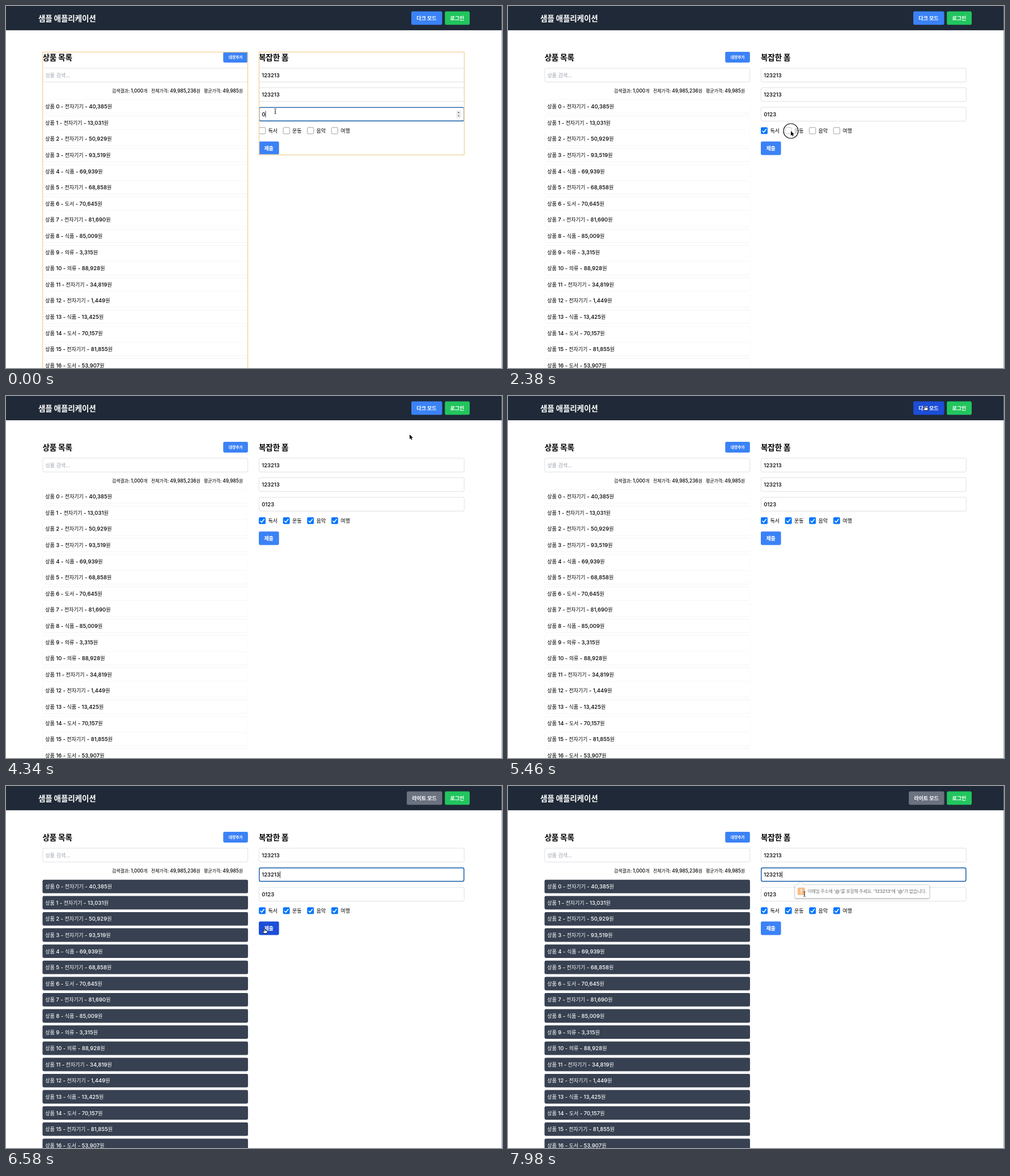
Write an HTML page that moves like this. It is 875 px wide and 640 px high and loops after 8000 ms.

```html
<!DOCTYPE html>
<html lang="ko">
<head>
<meta charset="utf-8">
<style>
html, body { margin: 0; width: 100%; height: 100%; overflow: hidden; background: #fff; }
svg { display: block; width: 875px; height: 640px; }
text { font: 500 9.53px Inter, "Noto Sans CJK KR", "Noto Sans CJK", sans-serif; white-space: pre; }
.k { font-family: "Noto Sans CJK KR", "Noto Sans CJK", sans-serif; font-size: .95em; letter-spacing: -.01em; }
.h { font-size: 14.3px; font-weight: 700; word-spacing: -.04em; }
.b { font-weight: 700; fill: #fff; }
.s { font-size: 8.34px; word-spacing: -.03em; }
.t { font-size: 7.15px; }
.tip { font-size: 8.15px; word-spacing: -.04em; }
.ph { fill: #9ca3af; font-weight: 400; }
.field { fill: #fff; stroke: #d1d5db; stroke-width: .7; }
#rows { filter: drop-shadow(0 .9px .5px rgba(0,0,0,.17)); }
#bubble { filter: drop-shadow(.5px 1px 1.2px rgba(0,0,0,.55)); }
</style>
</head>
<body>
<svg id="stage" viewBox="0 0 875 640"></svg>
<script>
const LOOP = 8000;
const BLUE = '#3b82f6', DEEP = '#1d4ed8', GRAY = '#6b7280', SLATE = '#374151';
const stage = document.getElementById('stage');

const wrap = s => s.replace(/[가-힣]+/g, m => `<tspan class="k">${m}</tspan>`);
const text = (x, y, s, cls = '', more = '') => `<text x="${x}" y="${y}" class="${cls}" ${more}>${wrap(s)}</text>`;
const rect = (x, y, w, h, more = '', r = 2.4) => `<rect x="${x}" y="${y}" width="${w}" height="${h}" rx="${r}" ${more}/>`;
const group = (id, body) => `<g id="${id}">${body}</g>`;

const kinds = { e: '전자기기', f: '식품', b: '도서', c: '의류' };
const items = ('e40,385 e13,031 e50,929 e93,519 f69,939 e68,858 b70,645 e81,690 f85,009 ' +
  'c3,315 c88,928 e34,819 e1,449 f13,425 b70,157 e81,855 b53,907').split(' ');
const hobbies = ['독서', '운동', '음악', '여행'];
const fieldY = [109.9, 144.4, 179.1];
const boxX = i => 446.4 + 42.6 * i;
const rowY = i => 165.8 + 28.6 * i;

const outline = (x, y, w, h) =>
  rect(x, y, w, h, 'fill="none" stroke="#f3f3f3" stroke-width="1.8"', 0) +
  rect(x, y, w, h, 'fill="none" class="line" stroke-width=".6"', 0);

const arrow = 'M0 0V8.2L1.9 6.5L3.2 9.4L4.6 8.8L3.3 6H5.9Z';
const hand = 'M-.9 0Q0-1 .8 0V3.2L4.4 4.1Q5.3 4.5 5.1 5.6L4.3 8.6H-.8L-3.2 5.2Q-3.2 4-1.9 4.4L-.9 5.3Z';
const beam = 'M-1.8-4.4Q0-4.4 0-3.4Q0-4.4 1.8-4.4M0-3.4V3.4M-1.8 4.4Q0 4.4 0 3.4Q0 4.4 1.8 4.4M-1 .9H1';

stage.innerHTML =
  rect(0, 0, 875, 640, 'fill="#fff"', 0) +
  rect(0, 0, 875, 42.9, 'fill="#1f2937"', 0) +
  rect(874, 0, 1, 640, 'fill="#8b8f96" opacity=".7"', 0) +
  text(57, 26.6, '샘플 애플리케이션', 'h', 'fill="#fff"') +
  rect(715, 9.5, 55, 23.8, 'id="mode"') +
  text(724.3, 25, '', 'b', 'id="modeText"') +
  rect(774.2, 9.5, 43.8, 23.8, 'fill="#22c55e"') + text(783.5, 25, '로그인', 'b') +
  text(64.5, 95.6, '상품 목록', 'h') +
  rect(383.2, 81.1, 43.6, 18.9, `fill="${BLUE}"`) + text(392.8, 93.2, '대량추가', 'b t') +
  rect(64.8, 109.9, 361.8, 24.4, 'class="field"') + text(69.4, 125.5, '상품 검색...', 'ph') +
  text(187, 153, '검색결과: 1,000개', 's') + text(256, 153, '전체가격: 49,985,236원', 's') +
  text(349, 153, '평균가격: 49,985원', 's') +
  group('rows', items.map((_, i) => rect(64.5, rowY(i), 362.4, 23.8)).join('')) +
  group('rowText', items.map((s, i) =>
    text(69.2, rowY(i) + 15.3, `상품 ${i} - ${kinds[s[0]]} - ${s.slice(1)}원`)).join('')) +
  text(446, 95.6, '복잡한 폼', 'h') +
  fieldY.map((y, i) => rect(446.4, y, 361.9, 24.4, 'class="field"') +
    text(451.2, y + 15.6, i < 2 ? '123213' : '0', '', `id="value${i}"`)).join('') +
  rect(446.8, 0, 361, 23.8, 'id="focus" fill="none" stroke="#155ba6" stroke-width="1.4"') +
  rect(0, 0, .8, 11.6, 'id="caret"', 0) +
  group('spin', rect(794, 184.6, 9, 13.4, 'fill="#efefef"', 1) +
    '<path d="M796.8 189.2L798.5 187L800.2 189.2ZM796.8 193.4L798.5 195.6L800.2 193.4Z" fill="#444"/>') +
  hobbies.map((s, i) => rect(boxX(i), 214.8, 11.2, 11.2, `id="box${i}" stroke-width=".7"`, 1.5) +
    `<path id="tick${i}" d="M${boxX(i) + 2.2} 220.7l2.5 2.5l4.5-5.6" fill="none" stroke="#fff" stroke-width="1.6"/>` +
    text(boxX(i) + 16, 223.9, s)).join('') +
  rect(446, 239.6, 35.6, 23.8, 'id="send"') + text(455.4, 255.2, '제출', 'b') +
  group('panels', outline(64.8, 81.3, 361.7, 570) + outline(446.3, 81.3, 362, 181.8)) +
  group('page', outline(.5, .5, 874, 639) + outline(.5, .5, 874, 42)) +
  group('bubble', '<path d="M508 174.6H510.5L516 169L521.5 174.6H741.5Q743.5 174.6 743.5 176.6V196.4Q743.5 198.4 741.5 198.4H508Q506 198.4 506 196.4V176.6Q506 174.6 508 174.6Z" fill="#fff" stroke="#888" stroke-width=".5"/>' +
    rect(510.8, 179.8, 13, 13, 'fill="#f08a30"', 1.2) +
    '<path d="M517.3 182V187.4M517.3 189.2V190.8" stroke="#fff" stroke-width="1.7"/>' +
    text(528.6, 189.2, "이메일 주소에 '@'를 포함해 주세요. '123213'에 '@'가 없습니다.", 'tip')) +
  '<circle id="ring" fill="#fff" fill-opacity=".5" stroke="#000" stroke-width="1.2"/>' +
  group('mouse', `<path id="arrow" d="${arrow}" stroke="#fff" stroke-width=".8" paint-order="stroke"/>` +
    `<path id="hand" d="${hand}" fill="#fff" stroke="#000" stroke-width=".8"/>` +
    `<path id="beam" d="${beam}" fill="none" stroke="#222" stroke-width=".9"/>`);

const el = {};
stage.querySelectorAll('[id]').forEach(n => el[n.id] = n);
const lines = stage.querySelectorAll('.line');
const set = (id, attrs) => { for (const k in attrs) el[id].setAttribute(k, attrs[k]); };
const show = (id, on) => el[id].style.display = on ? '' : 'none';
const label = (id, s) => { if (el[id].dataset.s !== s) { el[id].dataset.s = s; el[id].innerHTML = wrap(s); } };
const during = (t, spans) => spans.find(([a, b]) => t >= a && t < b);
const clamp = v => Math.max(0, Math.min(1, v));

// time, x, y
const path = [[0, 475, 186], [480, 475, 186], [910, 453, 221], [1820, 453, 221], [2030, 499, 221],
  [2660, 499, 221], [3300, 553, 222], [3570, 553, 222], [3780, 579, 222], [4150, 579, 222],
  [4340, 712, 68], [4500, 712, 68], [5110, 736, 17], [5600, 736, 17], [6160, 456, 252],
  [7560, 456, 252], [7910, 523, 191], [8000, 523, 191]];
// press, release, radius
const presses = [[1540, 1680, 13], [2380, 2520, 13], [3430, 3570, 13], [3920, 4060, 13],
  [5390, 5460, 19], [6440, 6580, 19], [7420, 7560, 16]];
const flashes = [[0, 1680], [1820, 2030], [2520, 2800], [3570, 3780], [4060, 4340], [5600, 5850]];
const typed = [200, 400, 600];

function pointer(t) {
  const i = path.findIndex(p => p[0] > t);
  const [a, x, y] = path[i - 1], [b, u, v] = path[i];
  const p = (t - a) / (b - a), e = p * p * (3 - 2 * p);
  return [x + (u - x) * e, y + (v - y) * e];
}

function draw(t) {
  const [x, y] = pointer(t);
  const over = (l, top, r, bottom) => x >= l && x <= r && y >= top && y <= bottom;
  const dark = t >= 5600;

  const left = dark ? 707 : 715;
  const onMode = over(left, 9, 770, 34), onSend = over(446, 239, 482, 264);
  set('mode', { x: left, width: 769.5 - left, fill: dark ? (onMode ? SLATE : GRAY) : (onMode ? DEEP : BLUE) });
  set('modeText', { x: left + 9.3 });
  label('modeText', dark ? '라이트 모드' : '다크 모드');
  set('send', { fill: onSend ? DEEP : BLUE });
  set('rows', { fill: dark ? SLATE : '#fff' });
  set('rowText', { fill: dark ? '#fff' : '#000' });

  const count = typed.filter(k => t >= k).length;
  label('value2', '0123'.slice(0, count + 1));
  const field = t < 1540 ? 2 : t >= 6580 && !during(t, [[7420, 7560]]) ? 1 : -1;
  show('focus', field >= 0);
  show('spin', field === 2);
  const since = t < 1540 ? t - (count ? typed[count - 1] : 0) : t - (t < 7560 ? 6580 : 7560);
  show('caret', field >= 0 && since % 1000 < 500);
  if (field >= 0) {
    set('focus', { y: fieldY[field] + .3 });
    set('caret', { x: 451.4 + el['value' + field].getComputedTextLength(), y: fieldY[field] + 6.4 });
  }

  hobbies.forEach((_, i) => {
    const on = t >= presses[i][1], hot = over(boxX(i), 212, boxX(i) + 35, 229);
    const fill = hot ? '#005cc8' : '#0075ff';
    set('box' + i, { fill: on ? fill : '#fff', stroke: on ? fill : hot ? '#555' : '#767676' });
    show('tick' + i, on);
  });

  const flash = during(t, flashes);
  show('panels', flash);
  show('page', flash && dark);
  lines.forEach(n => n.setAttribute('stroke', t < 1680 ? '#fdb23c' : '#37afa9'));

  const shown = t < 7420 ? clamp((t - 6640) / 467) : clamp((t - 7720) / 467);
  show('bubble', shown > 0);
  el.bubble.style.opacity = shown;

  const press = during(t, presses);
  show('ring', press);
  if (press) set('ring', { cx: x, cy: y, r: press[2] });

  const onField = fieldY.some(f => over(446, f, 808, f + 24.4));
  const shape = onMode || onSend ? 'hand' : onField ? 'beam' : 'arrow';
  ['hand', 'beam', 'arrow'].forEach(s => show(s, s === shape));
  set('mouse', { transform: `translate(${x.toFixed(2)} ${y.toFixed(2)})` });
}

const start = performance.now();
function tick(now) {
  draw(Math.max(0, now - start) % LOOP);
  requestAnimationFrame(tick);
}
draw(0);
requestAnimationFrame(tick);
</script>
</body>
</html>
```
